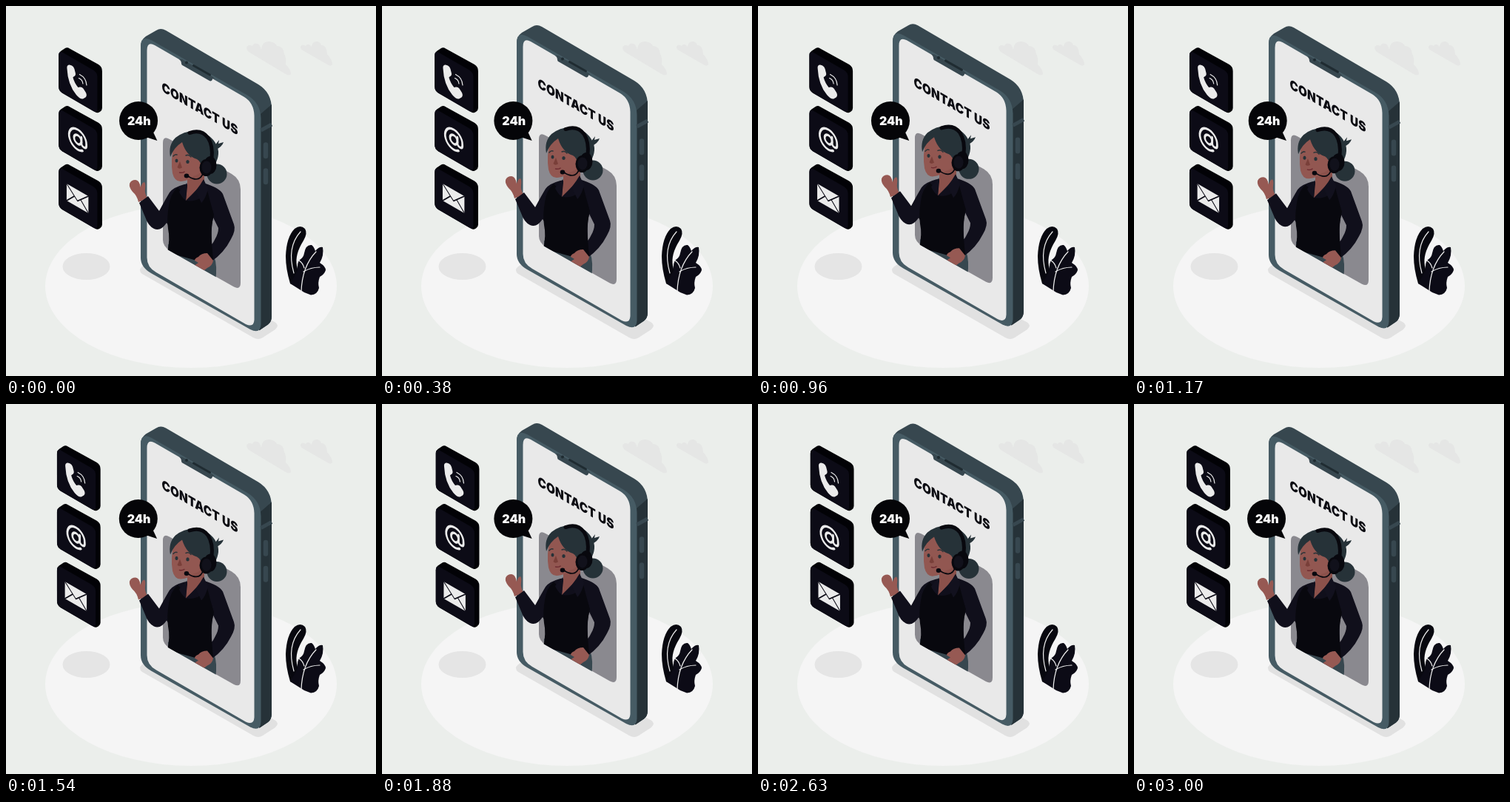
Write an HTML page that moves like this. It is 500 by 500 pixels and loops after 3.04 s.

```html
<!DOCTYPE html>
<html lang="en">
<head>
<meta charset="utf-8">
<title>Contact us</title>
<style>
  html, body { margin: 0; height: 100%; overflow: hidden; background: #ebeeeb; }
  svg { display: block; width: 100%; height: 100%; }
  text { font-family: Inter, "Open Sans", sans-serif; font-weight: 900; }
  .line { fill: none; stroke-linecap: round; stroke-linejoin: round; }
</style>
</head>
<body>
<svg viewBox="0 0 500 500">
  <defs>
    <clipPath id="panelClip"><path d="M150 150H330V392.500L219 329.500L150 320Z"/></clipPath>
    <g id="tile">
      <path fill="#020206" d="M71.300 67Q71.300 63 74 61L80 57Q83 55.500 86 57.500L125 79Q130 82 130 88V138Q130 141 127 143L125 144Q123 145 120 143L76 117.500Q71.300 114.500 71.300 109Z"/>
      <path fill="#0c0b16" d="M71.300 67Q71.300 60 77 63L118 86.500Q123.500 90 123.500 95.500V139Q123.500 145 118 142L76 117.500Q71.300 114.500 71.300 109Z"/>
    </g>
  </defs>

  <!-- floor, shadows and clouds -->
  <ellipse cx="250" cy="378.500" rx="197" ry="110.500" fill="#f5f5f5"/>
  <ellipse cx="108.500" cy="352" rx="32" ry="18" fill="#e5e5e5"/>
  <path fill="#e1e1e1" d="M184 352L198 343L363 427Q370 431 364 437L347 448Q341 452 334 448L184 362Q178 357 184 352Z"/>
  <g fill="#e5e6e5">
    <path d="M325 56Q327 51 333 54Q335 48 342 52Q344 55 345 59Q346 47 356 48Q364 49 366 54Q375 54 376 65Q379 69 378 79Q385 86 385 92Q383 95 378 92L328 62Q325 59 325 56Z"/>
    <path d="M398 56Q399 50 405 54Q408 49 413 55Q414 47 421 48Q425 49 426 53Q433 52 434 65Q441 73 441 79Q439 82 436 80L401 60Q398 58 398 56Z"/>
  </g>

  <!-- plant -->
  <path fill="#08080f" d="M384 375Q378 355 378 338Q379 312 390 301Q398 295 404 301Q408 307 402 317Q390 336 393 351Q396 362 399 382Z"/>
  <path fill="#0c0b16" d="M384 375L394 358Q393 346 397 343Q402 340 403 334Q405 322 413 323Q416 325 418 331Q423 325 428 326Q430 337 424 347Q432 352 432 357Q430 363 424 366Q421 374 423 381Q421 390 412 390.500L403 387Z"/>
  <g class="line" stroke="#eee" stroke-width="1.200">
    <path d="M389 361Q379 326 398 305M399 386Q400 352 419 332M402 359Q412 353 424 353M403 354Q401 347 396 344"/>
  </g>

  <g id="phone">
    <path fill="#37474f" d="M182 55Q182 46 189 41L203 33Q209 29 216 33L341 106Q359 117 359 139V419Q359 427 354 430.500L343 438L182 340Z"/>
    <path fill="#263238" d="M344 146L359 133V419Q359 427 354 430.500L342 438.500Z"/>
    <path fill="#465b64" d="M182 55Q182 38 197 46.500L326 120.500Q344 131 344.500 152V430Q344 444 330 437L196 361Q182 353 182 340Z"/>
    <path fill="#e9e9e9" d="M190.500 60Q190.500 47.500 201 53L322 123Q335 131 335.500 148V424Q335 435 324 430L203 360Q190.500 353 190.500 340Z"/>
    <path fill="#37474f" d="M234 72Q237 74 237 78Q237 80 240 81L274 100.500Q278 103 279 99Q279 97 282 99L280 96L238 72Z"/>
    <g class="line">
      <path stroke="#1f2b31" stroke-width="3" d="M253.500 80.500L275.500 93"/>
      <path stroke="#1f2b31" stroke-width="4" d="M244 76.500V76.600"/>
      <path stroke="#37474f" stroke-width="5" stroke-linecap="butt" d="M344.500 168L359 160"/>
      <path stroke="#37474f" stroke-width="6.500" d="M351 187.500V203M351 222.500V238"/>
    </g>
    <text transform="matrix(.866 .505 0 1 210.500 115)" font-size="17.600" letter-spacing=".2" fill="#0b0b12">CONTACT US</text>

    <!-- portrait panel -->
    <path fill="#8a898f" d="M212 185Q212 175 221 180L305 227Q317 234 317 248V374Q317 384 308 379.500L222 331Q212 325 212 316Z"/>

    <!-- agent -->
    <g clip-path="url(#panelClip)">
      <circle cx="285" cy="227" r="13.500" fill="#263238"/>
      <path fill="#263238" d="M277 195L288 181L287 186L294 184Q292 190 284 194Z"/>
      <path fill="#37474f" d="M219 322L281 338Q286 350 283 372L219 340Z"/>
      <path fill="#965953" d="M179 265Q177 256 171 251Q166 245 167 240Q169 235 175 235Q180 235 182 245Q184 238 187 238Q189 240 188 247Q187 252 191 260Z"/>
      <path fill="#100f1b" d="M180 266L192 257L207 277Q215 262 221 252Q226 245 241 241L266 239Q288 245 293 254L308 295Q311 303 304 315Q295 333 278 345L268 333Q278 325 283 314Q287 307 287 300L280 286Q276 302 279 330L224 303L217 293Q209 305 200 301Q192 297 188 285Z"/>
      <path fill="#08080e" d="M232 245Q239 252 243 263Q262 266 272 249Q276 265 281 282Q276 300 278 320L280 343Q267 347 254 343L218 333Q222 315 219 301Q217 287 220 270Q222 254 232 245Z"/>
      <path fill="#8b514b" d="M245 228L268 222V238L243 263L245 244Z"/>
      <path fill="#12111e" d="M244.500 239L243 263Q237 258 234 251Q240 244 244.500 239ZM267 234L273 247Q270 260 264 266L257 251L243 263Q259 249 267 234Z"/>
      <path fill="#965953" d="M252 355Q254 350 260 347L255 344Q255 341 260 339Q264 334 272 334L280 344Q279 351 272 354Q265 360 258 360Q253 359 252 355Z"/>

      <!-- face and hair -->
      <path fill="#925751" d="M227 189Q222 207 225 226Q228 238 237 237Q247 236 253 230Q268 226 273 208L262 184L242 177Z"/>
      <path fill="#263238" d="M222 204Q219 188 229 178Q241 168 258 169Q277 173 284 187Q291 199 282 215L265 222Q264 210 258 207Q244 203 238 184Q227 191 222 204Z"/>
      <path fill="#793f39" d="M235 210L231.500 218Q234 221 238 218.500Z"/>
      <g fill="#263238">
        <ellipse cx="230.500" cy="209" rx="2" ry="2.600"/>
        <ellipse cx="245.500" cy="210.500" rx="2.200" ry="2.600"/>
      </g>
      <g class="line">
        <path stroke="#2d3438" stroke-width="1.500" d="M226 203Q228 200 231 201M243 202Q247 200 250 204"/>
        <path stroke="#6e2c31" stroke-width="1.500" d="M234.500 225Q238 226 241 224"/>
        <path stroke="#08080e" stroke-width="5" d="M248 171.500Q264 166 273 178Q280 189 278 207"/>
        <path stroke="#08080e" stroke-width="1.700" d="M267 224Q264 234 257 234Q252 234 246 230"/>
      </g>
      <g fill="#08080e">
        <ellipse cx="244" cy="229.500" rx="3.300" ry="3"/>
        <ellipse cx="276" cy="215" rx="8.500" ry="12"/>
        <ellipse cx="270.500" cy="218.500" rx="9" ry="11.500"/>
      </g>
      <ellipse cx="271" cy="218" rx="6.500" ry="8.500" fill="#11111b"/>
    </g>
  </g>

  <g id="bubble">
    <circle cx="179.200" cy="155" r="26" fill="#050508"/>
    <path fill="#050508" d="M189 177L204.500 182L198 168Z"/>
    <text x="180" y="161" font-size="16" text-anchor="middle" fill="#fff">24h</text>
  </g>

  <g id="icons">
    <use href="#tile"/>
    <use href="#tile" y="78.700"/>
    <use href="#tile" y="157.400"/>
    <path fill="#ebebeb" d="M82.500 84Q82 79.500 86 79.500L89 80.500Q91.500 81.500 92.500 85L94 91Q94.500 94 91.500 95.500L90.500 96.500Q92.500 104 97.500 110L100 109.500Q102.500 109 104.500 111.500L108 117Q110 121 107.500 123.500L104 125.500Q100 126 95 120Q83.500 106 82.500 84Z"/>
    <g class="line" stroke="#ebebeb">
      <path stroke-width="1.200" d="M99.500 92.500Q108.500 97 109 107M98.500 97.500Q103.500 99.500 104 105"/>
      <g transform="matrix(.866 .5 0 1 97 180.500)" stroke-width="3.200">
        <circle r="5.800"/>
        <path d="M5.800 -6V2.500A3.900 4 0 0 0 13.500 2.500V0A13.500 13.500 0 1 0 7.500 11.200"/>
      </g>
    </g>
    <g transform="matrix(.866 .5 0 1 96.700 260)">
      <path fill="#ebebeb" d="M-17 -11.500H17V11.500H-17Z"/>
      <path class="line" stroke="#0c0b16" stroke-width="1.500" d="M-17 -11.500L0 3.500L17 -11.500M-17 11.500L-5 -.5M17 11.500L5 -.5"/>
    </g>
  </g>
</svg>
<script>
  const LOOP = 3040, FPS = 24;
  const SHAKE = [0, -1, 2, -4, 4, -4, 4, -4, 2, -1, 0];
  const $ = id => document.getElementById(id);
  const move = (id, x, y) => $(id).setAttribute("transform", `translate(${x} ${y})`);

  // Piecewise-linear shake, p in 0..1
  function shake(p) {
    const i = Math.floor(p * 10), f = p * 10 - i;
    return SHAKE[i] + (SHAKE[i + 1] - SHAKE[i]) * f;
  }

  function draw(now) {
    const step = Math.floor((now % LOOP + 5) * FPS / 1000);
    const s = (step + .5) / FPS;
    const half = s / 1.5 % 1;
    move("phone", 0, .3 - 10 * (1 - Math.abs(1 - 2 * half)));
    move("bubble", shake(half), 0);
    move("icons", shake(s / 3 % 1), 0);
  }

  const start = performance.now();
  function tick() {
    draw(performance.now() - start);
    requestAnimationFrame(tick);
  }
  tick();
</script>
</body>
</html>
```
